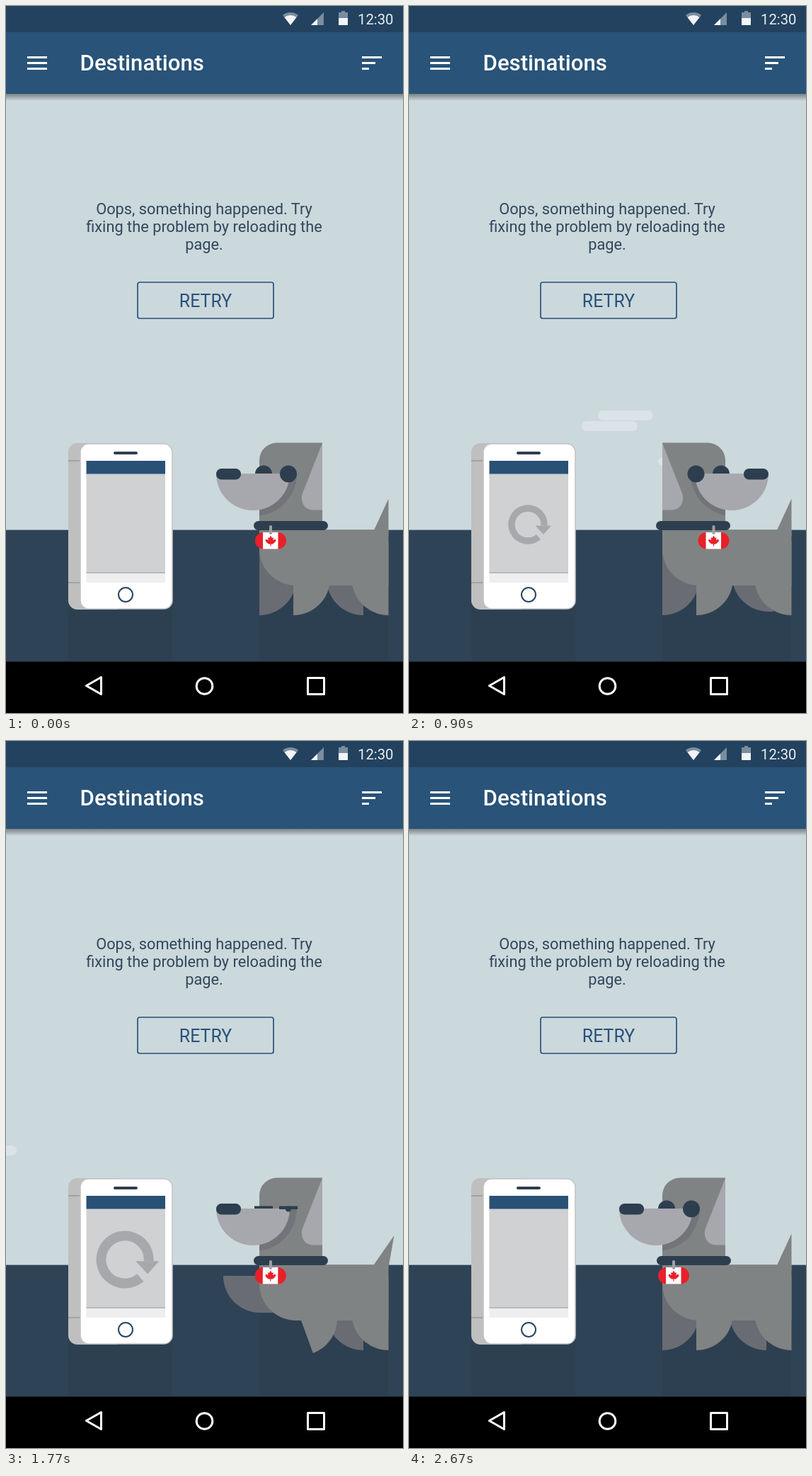
Animation, 561 px wide and 998 px high, one loop 2.7 s. Source, as an HTML page:

```html
<!DOCTYPE html>
<html lang="en">
<head>
<meta charset="utf-8">
<title>Destinations</title>
<style>
  html, body { margin: 0; width: 100%; height: 100%; overflow: hidden; background: #cbd8dc; }
  svg { display: block; width: 100%; height: 100%; }
  text { font-family: Roboto, sans-serif; }
  .fur { fill: #808383; }
  .shade { fill: #6a6c74; }
  .light { fill: #a7a8ad; }
  .dark { fill: #2d3e4f; }
  .white { fill: #fff; }
  .cloud { fill: #dbe3e6; }
  .red { fill: #e8202a; }
  .msg { font-size: 21.8px; fill: #33475b; text-anchor: middle; }
</style>
</head>
<body>
<svg viewBox="0 0 561 998">
  <defs>
    <linearGradient id="drop" x2="0" y2="1">
      <stop stop-color="#000" stop-opacity=".4"/>
      <stop offset="1" stop-color="#000" stop-opacity="0"/>
    </linearGradient>
    <clipPath id="headClip"><path id="skull"/></clipPath>
    <path id="leg" d="M0-52H52V0A52 52 0 0 1 0 52z"/>
    <path id="ear" d="M0 0L-28 71C-32 83-25 94.5-13 94.5H0z"/>
    <g id="eye">
      <circle id="pupil"/>
      <rect id="lid" x="-13" y="-4" width="26" height="4.5"/>
    </g>
    <g id="card">
      <path d="M-54-35H54V35H-54z" fill="#c4c5c8"/>
      <path d="M-51-32H51V32H-51z" fill="#e3e4e8"/>
      <path d="M-51 10H51V32H-51z" fill="#eeeff1"/>
    </g>
  </defs>
  <rect width="561" height="998" fill="#cbd8dc"/>

  <g id="clouds" class="cloud">
    <rect x="23" y="571" width="78" height="14" rx="7"/>
    <rect y="586" width="79" height="14" rx="7"/>
  </g>
  <rect id="wisp" class="cloud" y="637" width="63" height="11" rx="5.5"/>

  <rect y="739.6" width="561" height="187" fill="#2f4357"/>
  <path d="M88 840h147v86H88zM358 800h182v126H358z" fill="#2d4051"/>

  <g id="phone">
    <rect x="88" y="617" width="80" height="235" rx="13" fill="#bfbfbf"/>
    <path d="M88 642h18M88 814h18" stroke="#999" stroke-width="1.5"/>
    <rect x="105" y="618" width="130" height="233" rx="12" class="white" stroke="#c4c4c6" stroke-width="1.6"/>
    <rect x="152" y="629" width="34" height="4" rx="2" class="dark"/>
    <rect x="113.5" y="660" width="111.5" height="140" fill="#d0d1d3"/>
    <g id="icon">
      <path d="M15 17.5A23 23 0 1 1 23 1.5" fill="none" stroke="#a7a8ac" stroke-width="9.5"/>
      <path d="M10.5 1.5H33L22 14z" fill="#a7a8ac"/>
    </g>
    <use id="card1" href="#card"/>
    <use id="card2" href="#card"/>
    <rect x="113.5" y="642" width="111.5" height="18.5" fill="#295175"/>
    <rect x="113.5" y="799" width="111.5" height="15" fill="#eeeef1"/>
    <rect x="113.5" y="799" width="111.5" height="2" fill="#b9babc"/>
    <circle cx="169" cy="831" r="10" fill="none" stroke="#2b4660" stroke-width="2"/>
  </g>

  <g id="dog">
    <g id="frontFar" class="shade"><use href="#leg" x="358" y="808"/></g>
    <g id="hindFar" class="shade"><use href="#leg" transform="translate(505 808) scale(-1 1)"/></g>
    <g id="frontNear" class="fur"><use href="#leg" x="406" y="808"/></g>
    <g id="hindNear" class="fur"><use href="#leg" transform="translate(540.5 808) scale(-1 1)"/></g>
    <path id="tail" class="fur" d="M520 740L540.5 695.5V748H520z"/>
    <path class="fur" d="M358 739.5H540.5V818H410a52 52 0 0 1-52-52z"/>

    <g clip-path="url(#headClip)">
      <rect x="357" y="616" width="91" height="112" class="fur"/>
      <path id="jaw" fill="#737479" d="M291 660h120a60 60 0 0 1-120 0z"/>
      <use id="earR" class="light" href="#ear"/>
      <use id="earL" class="light" href="#ear"/>
    </g>
    <use id="farEye" class="dark" href="#eye"/>
    <path id="mouth" class="light" d="M297 660h104a52 52 0 0 1-104 0z"/>
    <use id="nearEye" class="dark" href="#eye"/>
    <rect id="nose" class="dark" x="297" y="653" width="35" height="15.5" rx="7.5"/>
    <rect id="collar" class="dark" x="350" y="727" width="105" height="13" rx="6.5"/>
    <g id="tag">
      <rect x="-22" y="8" width="44" height="23.5" rx="11.7" class="red"/>
      <rect x="-11" y="8" width="21.5" height="23.5" class="white"/>
      <path d="M0 12.5l2 3.5 2-1-.7 4 3.2-1.5 1 2-1 2-3.5 3H.6v3H-.6v-3H-3l-3.5-3-1-2 1-2 3.2 1.5-.7-4 2 1z" class="red"/>
      <rect x="-2" y="-2" width="4" height="13" rx="2" fill="#a0a1a6"/>
    </g>
  </g>

  <rect y="124" width="561" height="10" fill="url(#drop)"/>
  <rect width="561" height="124" fill="#295378"/>
  <rect width="561" height="37" fill="#22425f"/>
  <g class="white">
    <g opacity=".4">
      <path d="M402 27L391 13A17 17 0 0 1 413 13z"/>
      <path d="M449 9V27H431zM470 9h4V7h5v2h4V27H470z"/>
    </g>
    <path d="M402 27L393.5 16A14 14 0 0 1 410.5 16zM440 18V27H431zM470 17h13V27H470z" opacity=".9"/>
    <text x="497" y="26" font-size="20.25" opacity=".9">12:30</text>
    <text x="104.5" y="91" font-size="31.2" font-weight="500">Destinations</text>
    <path d="M30 71h28v3H30zm0 8h28v3H30zm0 8h28v3H30zM503 71h28v3H503zm0 8h19v3H503zm0 8h10v3H503z"/>
  </g>

  <text class="msg" x="280" y="294">Oops, something happened. Try</text>
  <text class="msg" x="280" y="319">fixing the problem by reloading the</text>
  <text class="msg" x="280" y="344">page.</text>
  <rect x="186" y="390" width="192" height="51" rx="3" fill="none" stroke="#29527a" stroke-width="1.7"/>
  <text x="282" y="425" font-size="24.9" fill="#29527a" text-anchor="middle">RETRY</text>

  <rect y="925.5" width="561" height="73"/>
  <g fill="none" stroke="#fff" stroke-width="3" stroke-linejoin="round">
    <path d="M113.500 959.500L134.500 947.500V971.500zM426.500 948.500h23v23h-23z"/>
    <circle cx="280.5" cy="960" r="11.3"/>
  </g>
</svg>
<script>
const LOOP = 2700, STEP = 30;
const TURN_AWAY = 570, TURN_BACK = 1170, TAP = 1920;
const $ = id => document.getElementById(id);
const move = (id, x, y = 0, rest = '') => $(id).setAttribute('transform', `translate(${x} ${y}) ${rest}`);
const turnAt = (id, angle, x, y) => $(id).setAttribute('transform', `rotate(${angle} ${x} ${y})`);

const ease = u => { u = Math.min(1, Math.max(0, u)); return u * u * (3 - 2 * u); };
// Rises from 0 to 1 after start and falls back to 0 at end
const bump = (t, start, end, ramp) => ease((t - start) / ramp) * ease((end - t) / ramp);
// Damped swing that begins at start
const sway = (t, start, halfPeriod) => t < start ? 0 :
  Math.sin(Math.PI * (t - start) / halfPeriod) * Math.exp((start - t) / 200);

function drawSky(t) {
  move('clouds', 585 - 0.379 * t);
  move('wisp', 555 - 0.2256 * t);
  $('wisp').setAttribute('opacity', bump(t, 60, 1890, 300));
}

function drawPhone(t) {
  const hop = Math.sin(Math.PI * Math.min(1, Math.max(0, (t - TAP) / 280)));
  move('phone', 0, -9 * hop, `rotate(${1.8 * sway(t, TAP, 130)} 169 735)`);
  const icon = bump(t, 480, TAP, 130) * (1 + 0.46 * ease((t - 1650) / 120));
  move('icon', 168, 732, `scale(${icon})`);
  move('card1', 168.5, 698, `scale(${bump(t, 2010, 2550, 120)})`);
  move('card2', 169.5, 763.5, `scale(${bump(t, 1980, 2580, 120)})`);
}

function drawBody(t, perk) {
  const reach = bump(t, 1440, 2460, 180);
  const happy = bump(t, 240, 660, 120) + bump(t, 1380, 2460, 120);
  turnAt('frontFar', 90 * reach, 385, 782);
  turnAt('frontNear', -20 * reach, 431, 783);
  turnAt('hindNear', -14.4 * perk, 517, 778);
  turnAt('hindFar', -8 * bump(t, 720, 1140, 180), 471, 782);
  turnAt('tail', 18 * happy * Math.cos(Math.PI * (t - 2100) / 268) ** 2, 530, 742);
}

function drawHead(t, perk) {
  const turn = bump(t, TURN_AWAY, TURN_BACK + 120, 120);
  const left = 25 * (1 - turn), right = 25 * turn, sniff = -2 * perk;
  $('skull').setAttribute('d', `M358 728V${616.5 + left}a${left} ${left} 0 0 1 ${left} ${-left}` +
    `H${447 - right}a${right} ${right} 0 0 1 ${right} ${right}V728z`);
  move('jaw', 107 * turn, sniff);
  move('mouth', 107 * turn, sniff);
  move('nose', 176 * turn, sniff);
  move('collar', -turn);
  move('earR', 447 + 32 * turn, 617);
  move('earL', 358 - 32 * (1 - turn), 617, 'scale(-1 1)');

  const blink = bump(t, 1680, 1890, 90);
  $('pupil').setAttribute('r', 12 - 8 * blink);
  $('lid').setAttribute('opacity', blink > 0.5 ? 1 : 0);
  move('farEye', 364 + 77 * turn, 660.5);
  move('nearEye', 399 + 6.5 * turn, 660.5);

  const swing = 20 * (sway(t, TURN_AWAY, 330) - sway(t, TURN_BACK, 330));
  move('tag', 374 + 56.5 * turn, 735, `rotate(${swing})`);
}

function frame(now) {
  const t = Math.floor(now % LOOP / STEP) * STEP;
  const perk = bump(t, 240, 660, 180);
  drawSky(t);
  drawPhone(t);
  drawBody(t, perk);
  drawHead(t, perk);
  requestAnimationFrame(frame);
}
frame(performance.now());
</script>
</body>
</html>
```
